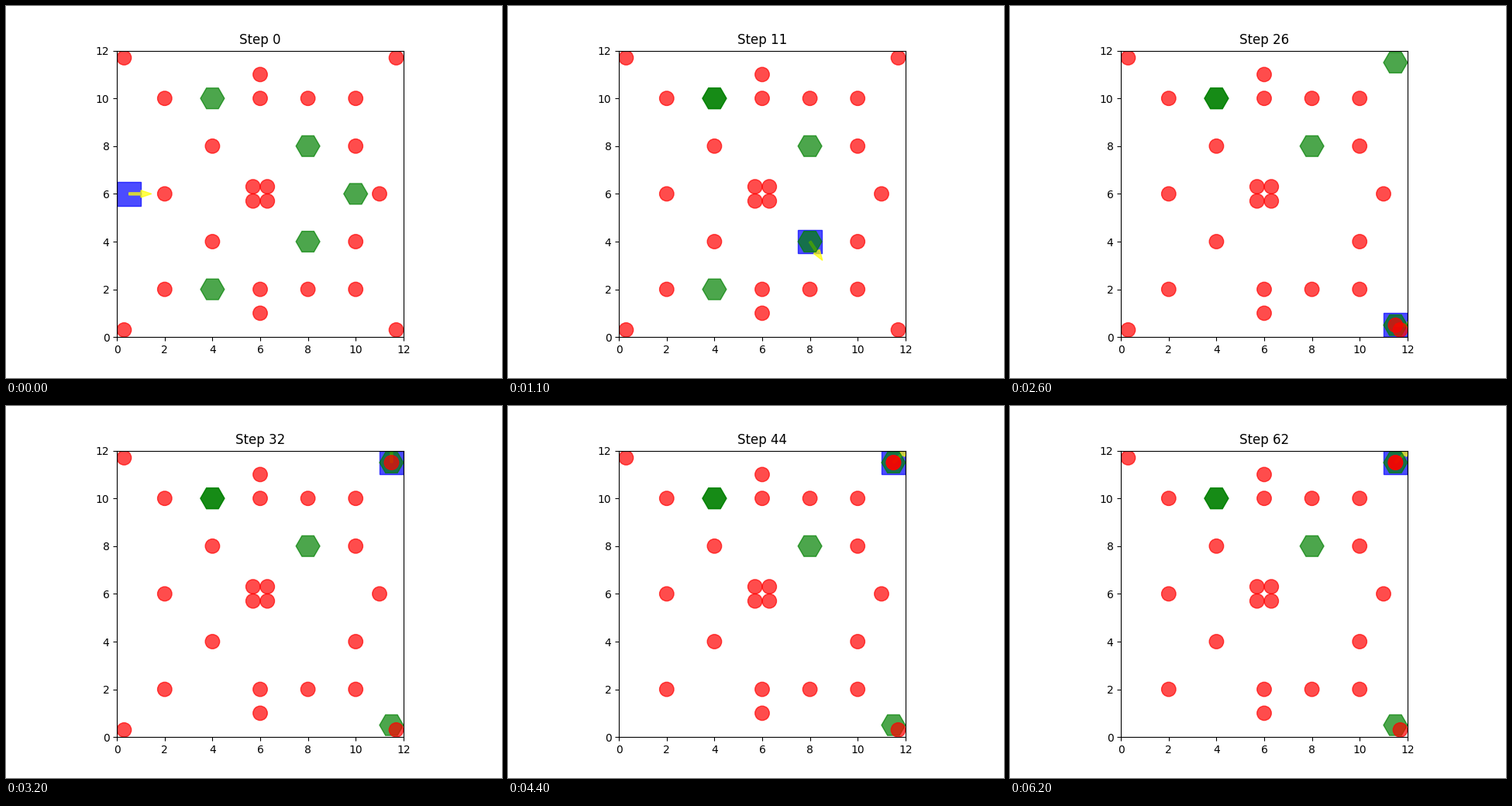
Write a matplotlib script that moves like this. It is 640 px wide and 480 px high and loops after 6.3 s.

```python
import math
from itertools import product

import matplotlib.pyplot as plt
from matplotlib.animation import FuncAnimation
from matplotlib.patches import Circle, Rectangle, RegularPolygon

STEPS = 63
INTERVAL = 100
DWELL = 2  # steps spent at each stop
FIELD = 12
ALPHA = 0.7

# Key places on the field
START, FAR = (0.5, 6), (10, 6)
LEFT_LOW, LEFT_HIGH = (4, 2), (4, 10)
RIGHT_LOW, RIGHT_HIGH = (8, 4), (8, 8)
BL, TL, BR, TR = product((0.5, FIELD - 0.5), repeat=2)

GOALS = [LEFT_LOW, LEFT_HIGH, RIGHT_LOW, RIGHT_HIGH, FAR]
RINGS = [
    *product((0.3, FIELD - 0.3), repeat=2),
    *product((5.7, 6.3), repeat=2),
    *product((2, 6, 8, 10), (2, 10)),
    *product((4, 10), (4, 8)),
    *product((6,), (1, 11)),
    *product((2, 11), (6,)),
]

ROUTE = [
    START, FAR, BR, *[LEFT_HIGH] * 2, RIGHT_LOW, LEFT_LOW, TR,
    *[LEFT_HIGH] * 3, RIGHT_LOW, *[BR] * 4, TR, LEFT_HIGH,
    *[TR, BL] * 3, *[TR] * 2, TL, RIGHT_HIGH, TR, *[BL] * 2, TR,
]

# Goal -> stops where it is picked up and dropped
CARRIED = {FAR: (1, 3), LEFT_LOW: (6, 7), RIGHT_LOW: (11, 12)}

# Corner ring -> first stop at that corner
COLLECTED = {
    (FIELD - 0.3, FIELD - 0.3): ROUTE.index(TR),
    (0.3, 0.3): ROUTE.index(BL),
}


def goal_place(goal, stop):
    pick, drop = CARRIED.get(goal, (STEPS, STEPS))
    return goal if stop < pick else ROUTE[min(stop, drop)]


def ring_place(ring, stop):
    return ring if stop < COLLECTED.get(ring, STEPS) else ROUTE[stop]


def heading_at(stop):
    """Direction of the last drive; a robot that stays put faces right."""
    (x0, y0), (x1, y1) = ROUTE[max(stop - 1, 0)], ROUTE[stop]
    return math.atan2(y1 - y0, x1 - x0)


fig, ax = plt.subplots(figsize=(6.4, 4.8), dpi=100)


def draw(step):
    stop = step // DWELL
    x, y = ROUTE[stop]
    angle = heading_at(stop)

    ax.clear()
    ax.set(xlim=(0, FIELD), ylim=(0, FIELD), aspect="equal", title=f"Step {step}")
    ax.add_patch(Rectangle((x - 0.5, y - 0.5), 1, 1, color="blue", alpha=ALPHA))
    ax.arrow(x, y, 0.5 * math.cos(angle), 0.5 * math.sin(angle),
             width=0.1, color="yellow", alpha=ALPHA)
    for goal in GOALS:
        ax.add_patch(RegularPolygon(goal_place(goal, stop), 6, radius=0.5,
                                    orientation=math.pi / 6,
                                    color="green", alpha=ALPHA))
    for ring in RINGS:
        ax.add_patch(Circle(ring_place(ring, stop), 0.3, color="red", alpha=ALPHA))
    return []


anim = FuncAnimation(fig, draw, frames=STEPS, interval=INTERVAL,
                     init_func=lambda: draw(0), repeat=True, repeat_delay=0)
plt.show()
```
